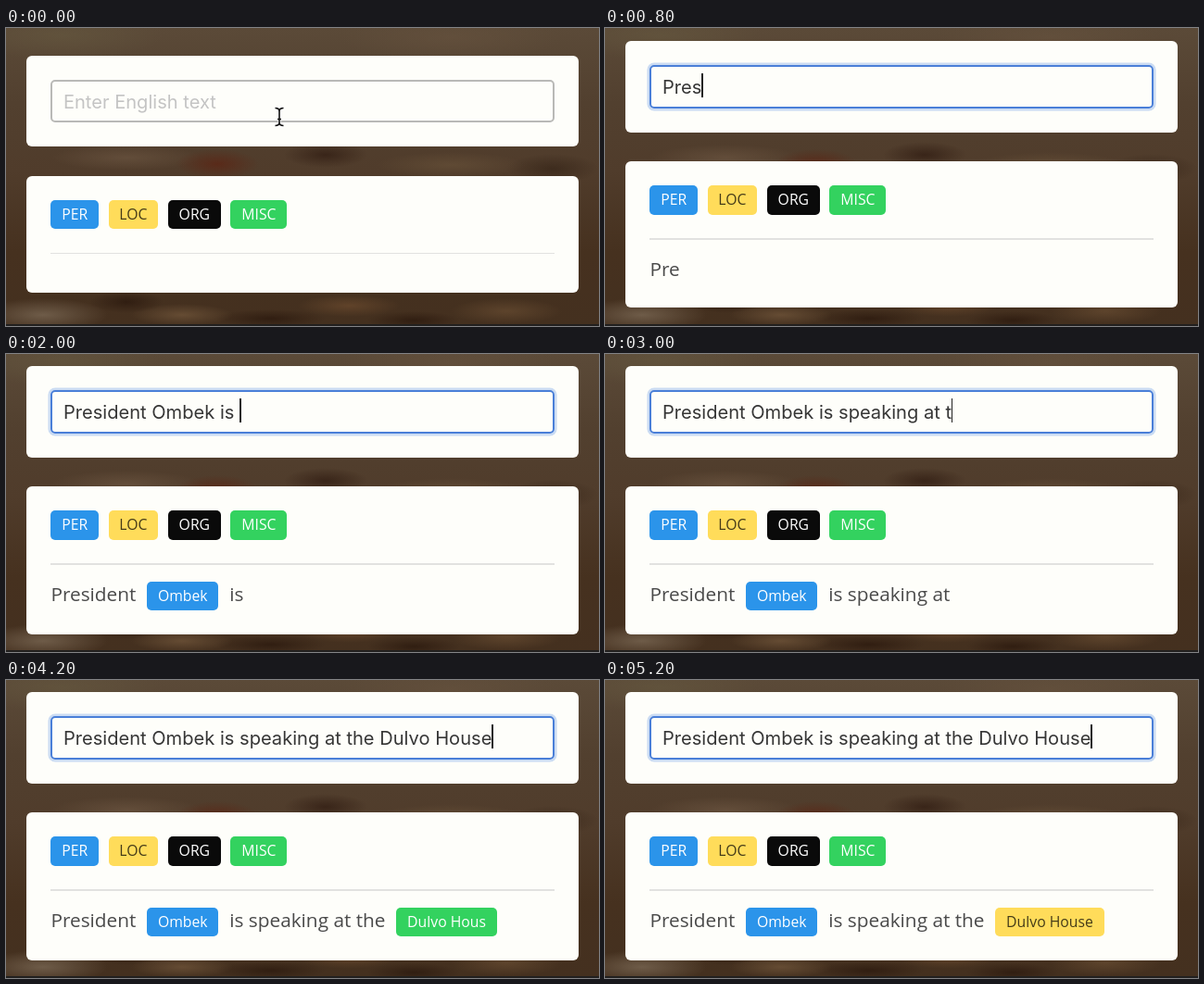
These frames come from a looping animation (640x322 px, 5.4 s). An HTML page:

```html
<!DOCTYPE html>
<html lang="en">
<head>
<meta charset="utf-8">
<title>Entity tagger</title>
<style>
* { box-sizing: border-box; }
html, body { margin: 0; width: 100%; height: 100%; overflow: hidden; }
body {
  position: relative;
  font: 20.8px/31.2px "Open Sans", sans-serif;
  color: #4a4a4a;
  background:
    linear-gradient(#0000 320px, #22201f 320px),
    radial-gradient(45px 16px at 228px 147px, #5c2413c0, #0000),
    radial-gradient(45px 14px at 345px 137px, #2e1a10b0, #0000),
    radial-gradient(80px 14px at 130px 140px, #6a5440b0, #0000),
    radial-gradient(80px 14px at 480px 148px, #665038b0, #0000),
    radial-gradient(50px 16px at 590px 152px, #352417b0, #0000),
    radial-gradient(70px 18px at 40px 310px, #7c6a56c0, #0000),
    radial-gradient(40px 12px at 130px 296px, #2a180dc0, #0000),
    radial-gradient(55px 12px at 190px 310px, #70553ac0, #0000),
    radial-gradient(60px 10px at 285px 314px, #2a180dc0, #0000),
    radial-gradient(55px 12px at 370px 300px, #69492dc0, #0000),
    radial-gradient(50px 10px at 440px 316px, #2a180dc0, #0000),
    radial-gradient(60px 14px at 540px 306px, #654a30c0, #0000),
    radial-gradient(110px 26px at 60px 8px, #65583fa0, #0000),
    radial-gradient(120px 26px at 480px 10px, #66523ea0, #0000),
    linear-gradient(#5b4a38, #52402f 25%, #503c2b 48%, #46311f 75%, #44301f);
}
main {
  height: 316px;
  padding: 0 22.4px;
  display: flex;
  flex-direction: column;
  justify-content: center;
  gap: 31.4px;
}
section { padding: 26px; border-radius: 6px; background: #fefefa; }
#field {
  display: flex;
  align-items: center;
  height: 46.8px;
  padding: 2px 0 0 11.5px;
  border: 2px solid #b9b9b7;
  border-radius: 5px;
  font: 20.1px Inter, sans-serif;
  color: #363636;
  white-space: pre;
}
#field.focus { border-color: #4a7fd8; box-shadow: 0 0 0 2.5px #3273dc40; }
#hint { color: #c4c4c4; }
#caret { width: 1.5px; height: 26px; margin-top: -4px; background: #222; }
.legend { display: flex; gap: 10.6px; }
.tag {
  display: inline-flex;
  align-items: center;
  height: 31.5px;
  padding: 0 11.8px;
  border-radius: 5px;
  font-size: 15.75px;
  color: #fff;
  white-space: pre;
}
.per { background: #2b94ea; }
.loc { background: #ffdc5a; color: #000b; }
.org { background: #0a0a0a; }
.misc { background: #33d25f; }
hr { height: 1.5px; margin: 25.5px 0 16px; border: 0; background: #e2e2e0; }
#out .tag { margin: 0 6.4px; }
#mouse { position: absolute; left: 289px; top: 85px; }
</style>
</head>
<body>
<main>
  <section>
    <div id="field"><span id="typed"></span><i id="caret"></i><span id="hint">Enter English text</span></div>
  </section>
  <section>
    <div class="legend">
      <span class="tag per">PER</span><span class="tag loc">LOC</span><span class="tag org">ORG</span><span class="tag misc">MISC</span>
    </div>
    <hr>
    <div id="out"></div>
  </section>
</main>
<svg id="mouse" width="12" height="22" fill="none">
  <defs><path id="beam" d="M1.5 1.5Q6 1.5 6 5V17Q6 20.5 1.5 20.5M10.5 1.5Q6 1.5 6 5M6 17Q6 20.5 10.5 20.5M4 13.5H8"/></defs>
  <use href="#beam" stroke="#fff" stroke-width="3"/>
  <use href="#beam" stroke="#111" stroke-width="1.6"/>
</svg>
<script>
const LOOP = 5400, STEP = 200;
const PERSON = "Ombek", PLACE = "Dulvo House";
const parts = ["President ", PERSON, " is speaking at the ", PLACE];
const text = parts.join("");
const $ = id => document.getElementById(id);
const show = (id, on) => $(id).style.display = on ? "" : "none";

// Tags the part of the sentence that has been analysed so far.
function annotate(length) {
  let html = "";
  for (const part of parts) {
    const piece = part.slice(0, Math.max(0, length));
    length -= part.length;
    const kind = part === PERSON ? "per"
      : part !== PLACE ? ""
      : piece === PLACE ? "loc" : "misc";
    html += kind && piece.length > 1 ? `<span class="tag ${kind}">${piece}</span>` : piece;
  }
  return html;
}

function draw(step) {
  const count = step < 3 ? 0 : Math.min(text.length, Math.round(1 + 2.55 * (step - 3)));
  const focused = step > 0;
  $("field").classList.toggle("focus", focused);
  show("caret", focused);
  show("hint", !count);
  show("mouse", !count);
  $("typed").textContent = text.slice(0, count);
  // The analysis runs one character behind until typing stops.
  $("out").innerHTML = annotate(step > 21 ? count : count - 1);
}

let shown = -1;
function tick() {
  const step = Math.floor(performance.now() % LOOP / STEP);
  if (step !== shown) draw(shown = step);
  requestAnimationFrame(tick);
}
tick();
</script>
</body>
</html>
```
